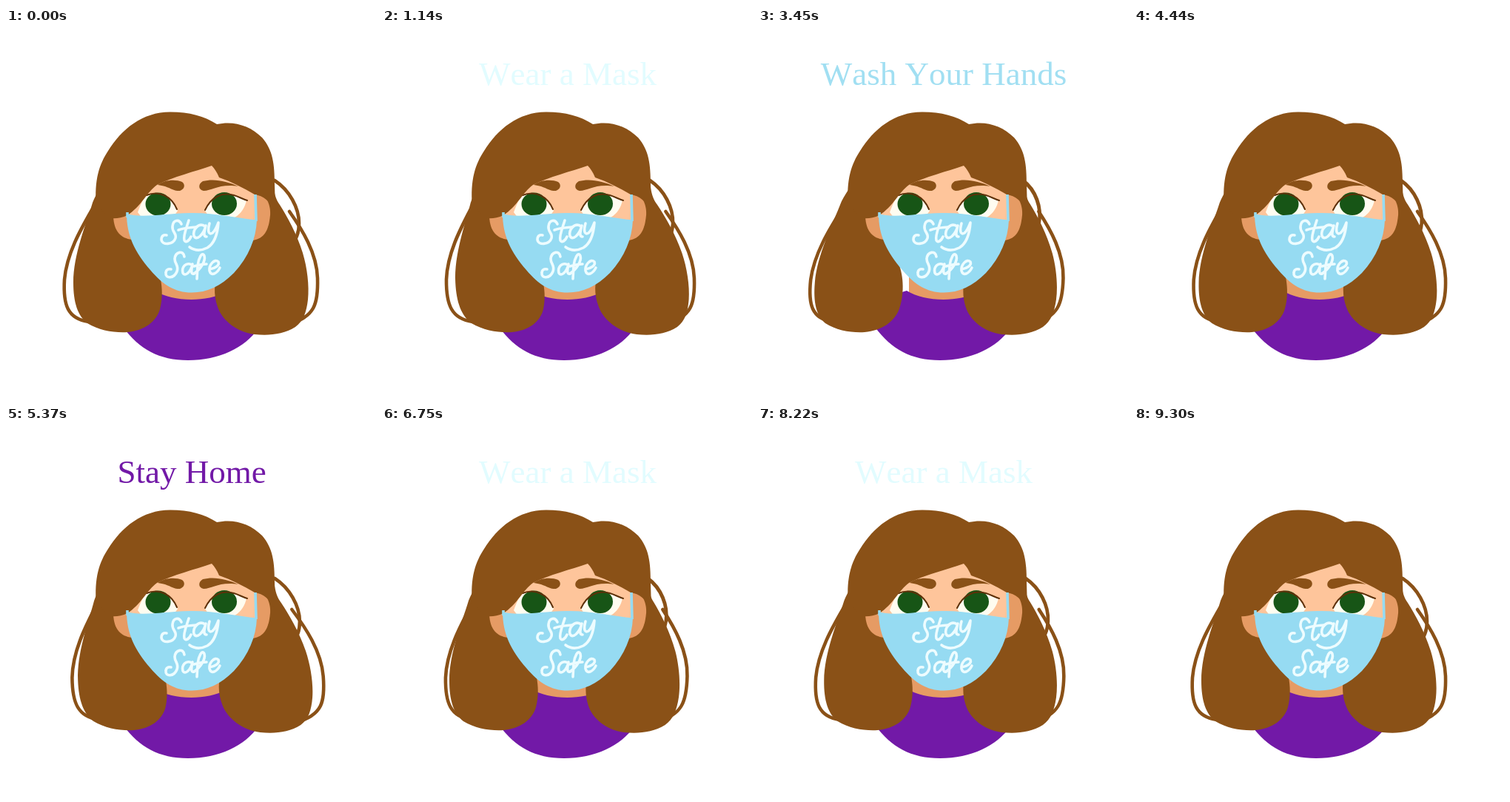
An HTML page for the animation above (9330 ms loop, 500 by 500 pixels).

```html
<!DOCTYPE html>
<html lang="en">
<head>
<meta charset="utf-8">
<title>Stay Safe</title>
<style>
  html, body { margin: 0; width: 100%; height: 100%; overflow: hidden; background: #fff; }
  svg { display: block; width: 100%; height: 100%; }
  .hair { fill: #8a5117; }
  .strand { fill: none; stroke: #8a5117; stroke-width: 4.6; stroke-linecap: round; }
  .shade { fill: #e69b64; }
  .skin { fill: #fec59b; }
  .blue { fill: #96dbf2; }
  .white { fill: #fffcf0; }
  .iris { fill: #175516; }
  .lid { fill: none; stroke: #5d3008; stroke-width: 2; stroke-linecap: round; }
  .letters { fill: none; stroke: #edfcff; stroke-width: 3.6; stroke-linecap: round; stroke-linejoin: round; }
  #title { font: 45px "Liberation Serif", "Times New Roman", serif; font-kerning: none; text-anchor: middle; }
</style>
</head>
<body>
<svg viewBox="0 0 500 500">
  <text id="title" x="251" y="76.500"></text>

  <path class="shade" d="M204 325H296V375H204Z"/>
  <path fill="#7219a7" d="M201 355C225 370 270 371 297 357C330 361 350 385 341 406C323 432 288 449 246 449C207 449 180 434 158 404C152 385 175 362 201 355Z"/>

  <path id="strandL" class="strand" d="M116 246C101 272 82 305 79 340C77 374 83 393 112 397"/>
  <path id="curlR" class="strand" d="M363 206C383 219 396 243 396 264C396 279 391 286 386 294"/>
  <path id="strandR" class="strand" d="M383 248C400 272 420 304 421 338C422 372 418 391 380 401"/>
  <path id="lobeL" class="hair" d="M142 190C130 212 122 223 117 236C108 266 91 306 91 344C91 371 97 389 110 399C126 409 147 412 164 411C187 409 203 397 208 380C212 365 211 351 209 340C206 320 192 298 172 270L160 190Z"/>
  <path id="lobeR" class="hair" d="M340 190L360 190C362 210 360 225 370 239C380 255 393 278 401 304C407 324 410 348 408 367C406 384 402 396 391 404C375 414 356 416 336 414C312 411 292 395 286 377C280 360 281 342 288 330C300 305 322 296 330 270Z"/>

  <path class="shade" d="M145 255C146 275 155 284 170 286L176 248Z"/>
  <path class="shade" d="M334 218C351 222 358 238 357 253C355 274 349 284 334 287Z"/>
  <path class="skin" d="M164 180H337V275H166Z"/>

  <path class="white" d="M178 249C183 235 186 230 191 226C210 219 227 232 232 247L225 257H184Z"/>
  <ellipse class="iris" cx="205.500" cy="238" rx="17" ry="15.500"/>
  <path class="lid" d="M190 226C208 219 224 228 231 245"/>
  <path class="white" d="M269 247C275 230 292 221 309 226C316 228 319 231 325 233C323 242 318 251 309 256H275Z"/>
  <ellipse class="iris" cx="295" cy="237.500" rx="17" ry="15.500"/>
  <path class="lid" d="M269 246C277 229 291 221 308 226C315 228 319 231 326 233"/>

  <path class="hair" d="M122 240C119 206 126 184 138 166C156 137 184 113.500 222 113.500C248 113.500 268 119 285 130C308 125 330 132 346 148C361 165 363 185 363 212L364 248C356 233 348 227 336 225C321 216 305 208 288 202C285 195 282 190 278 186C255 194 226 201 204 212C190 222 183 241 164 253C156 257 148 258 140 257Z"/>
  <path class="hair" d="M205 212C214 205 229 204 238 208C243 212 241 218 235 220C225 221 222 214 205 212Z"/>
  <path class="hair" d="M314 214C299 207 281 203 266 207C259 211 260 219 267 220C279 220 288 210 314 214Z"/>

  <path d="M337 225L338 261M164 249V256" fill="none" stroke="#96dbf2" stroke-width="3.600"/>
  <path class="blue" d="M163 251C182 257 213 251 248 250C280 249 312 257 339 259.500C338 285 328 309 308 331C290 349 272 357.500 251 357.500C228 357.500 212 347 195 327C174 303 163 280 163 251Z"/>

  <g class="letters">
    <path d="M237 265C234 258 226 259 225 268C224 276 231 277 229 284C226 293 211 294 210 286C210 281 213 279 217 280"/>
    <path d="M247 260C244 270 239 281 241 287C243 291 248 287 250 282M233 273C241 270 248 270 257 269"/>
    <path d="M269 268C260 262 252 273 254 281C257 288 267 280 270 267C267 278 267 282 271 282"/>
    <path d="M275 264C272 275 274 280 279 277C283 274 285 268 287 263C286 277 282 291 272 297C264 301 255 301 248 296"/>
    <path d="M241 309C240 300 229 302 228 312C228 319 234 321 231 329C227 339 215 339 216 331C216 327 219 325 223 326"/>
    <path d="M251 320C243 316 237 323 239 331C242 337 250 329 252 319C250 329 250 333 254 332"/>
    <path d="M254 332C263 326 270 315 268 308C265 301 260 312 259 321L258 339M254 322C261 320 266 319 271 319"/>
    <path d="M275 326C282 325 289 321 287 316C282 311 274 320 275 328C277 336 285 332 289 324"/>
  </g>
</svg>
<script>
  const LOOP = 9330, STEP = 30;
  const byId = id => document.getElementById(id);

  // Turning points of the breeze, and each part's lean there in px
  const turns = [0, 2160, 3450, 5370, 6750, 8220, LOOP];
  const lean = {
    lobeL: [0, 17, -16, 7, 0, -2, 0],
    lobeR: [0, 12, -5, 6, -7, -5, 0],
    strandL: [0, 17, -9, 12, 8, -1, 0],
    strandR: [0, 2, -10, 9, -10, -9, 0],
    curlR: [0, -12, -36, 2, -27, -9, 0]
  };
  const ROOT = 180, LENGTH = 185;

  // One heading per slot, with a short pause around it
  const SLOT = 2160, SHOW = 150, HIDE = 1860;
  const mask = ["Wear a Mask", "#e2fcff"];
  const titles = [mask, ["Wash Your Hands", "#a1dff2"], ["Stay Home", "#7219a7"], mask];

  function drawHair(t) {
    const i = turns.findIndex(end => end > t);
    const u = (t - turns[i - 1]) / (turns[i] - turns[i - 1]);
    const ease = (1 - Math.cos(Math.PI * u)) / 2;
    for (const [id, px] of Object.entries(lean)) {
      const k = (px[i - 1] + (px[i] - px[i - 1]) * ease) / LENGTH;
      byId(id).setAttribute("transform", `matrix(1 0 ${k} 1 ${-ROOT * k} 0)`);
    }
  }

  function drawTitle(t) {
    const local = t % SLOT;
    const open = local >= SHOW && local < HIDE;
    const [words, colour] = open && titles[Math.floor(t / SLOT)] || ["", "none"];
    const title = byId("title");
    title.textContent = words;
    title.setAttribute("fill", colour);
  }

  const start = performance.now();
  function tick() {
    const t = (performance.now() - start) % LOOP;
    const frame = Math.floor(t / STEP) * STEP;
    drawHair(frame);
    drawTitle(frame);
    requestAnimationFrame(tick);
  }
  tick();
</script>
</body>
</html>
```
